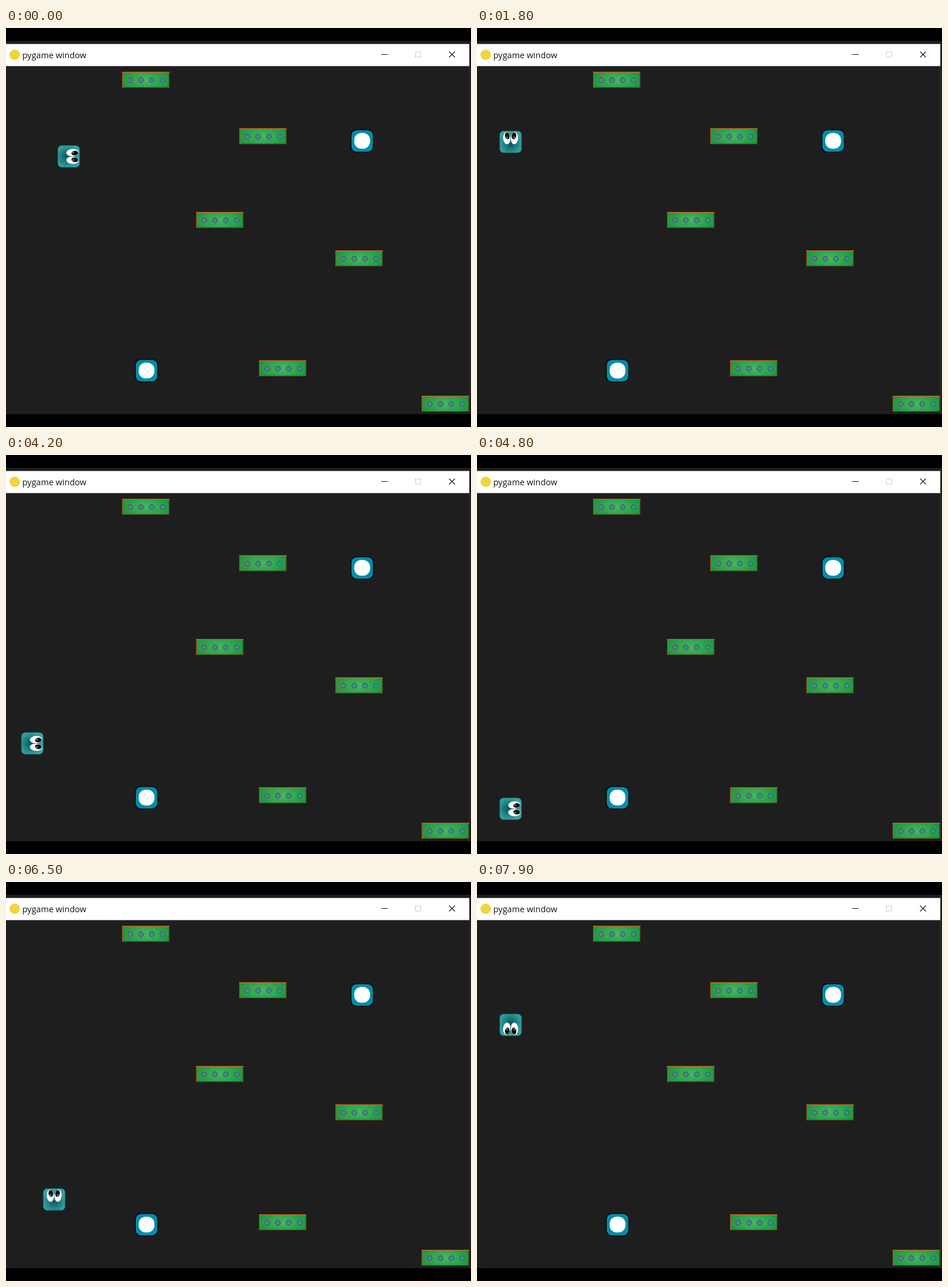
An HTML page with a canvas that plays this animation: 798x686 px, repeating every 8000 ms.

```html
<!DOCTYPE html>
<html lang="en">
<head>
<meta charset="utf-8">
<title>pygame window</title>
<style>
html, body { margin: 0; width: 100%; height: 100%; overflow: hidden; background: #000; }
canvas { display: block; }
</style>
</head>
<body>
<canvas id="stage" width="798" height="686"></canvas>
<script>
const ctx = document.getElementById("stage").getContext("2d");
const LOOP = 8000, TICK = 100, CELL = 12.5, SIZE = 38, SPEED = 4;
const UP = 0, RIGHT = 1, DOWN = 2, LEFT = 3;

const platforms = [[200, 76], [401, 173], [327, 317], [566, 383], [435, 572], [714, 633]];
const blocks = [[611.2, 194.2], [241.2, 589.2]];

// Key points of the walk: tick of arrival, column, row
const stops = [
  [0, 7, 11], [7, 22, -2], [9, 22, 1], [10, 22, -2], [17, 2, 12], [19, 4, 6],
  [22, 1, 9], [24, 3, 2], [27, -4, 5], [41, -4, 34], [43, 7, 31], [47, 0, 42],
  [48, 3, 42], [49, 7, 42], [53, 0, 37], [55, 5, 39], [57, 2, 41], [59, 1, 42],
  [60, 2, 43], [61, 2, 43], [62, 6, 41], [64, 8, 39], [67, 0, 33], [69, 2, 30],
  [71, 0, 29], [72, 2, 28], [74, -4, 24], [75, -4, 22], [77, 5, 17], [78, 3, 12],
  [79, 3, 13]
];

// Walks each leg as a staircase, leaving as late as the speed allows
function pose(tick) {
  let [last, col, row] = stops[0];
  let turn = RIGHT;
  for (const [end, toCol, toRow] of stops.slice(1)) {
    const dx = toCol - col, dy = toRow - row;
    const across = Math.abs(dx), total = across + Math.abs(dy);
    const start = Math.max(last, end - Math.ceil(total / SPEED));
    if (tick <= start) break;
    const part = Math.min(1, (tick - start) / (end - start));
    const steps = Math.round(total * part);
    const acrossAt = n => total ? Math.ceil(n * across / total) : 0;
    const moved = acrossAt(steps);
    if (steps) {
      const sideways = moved > acrossAt(steps - 1);
      turn = sideways ? (dx > 0 ? RIGHT : LEFT) : (dy > 0 ? DOWN : UP);
    }
    col += Math.sign(dx) * moved;
    row += Math.sign(dy) * (steps - moved);
    if (tick < end) break;
    last = end;
  }
  return { x: 1.2 + col * CELL, y: 64.3 + row * CELL, turn };
}

function rect(x, y, w, h, fill) {
  ctx.fillStyle = fill;
  ctx.fillRect(x, y, w, h);
}

function rounded(x, y, size, r, fill) {
  ctx.beginPath();
  ctx.roundRect(x - size / 2, y - size / 2, size, size, r);
  ctx.fillStyle = fill;
  ctx.fill();
}

function oval(x, y, rx, ry, fill, angle = 0) {
  ctx.beginPath();
  ctx.ellipse(x, y, rx, ry, angle, 0, Math.PI * 2);
  ctx.fillStyle = fill;
  ctx.fill();
}

function line(points, color, width, closed) {
  ctx.beginPath();
  for (const [x, y] of points) ctx.lineTo(x, y);
  if (closed) ctx.closePath();
  ctx.strokeStyle = color;
  ctx.lineWidth = width;
  ctx.stroke();
}

function radial(y, r, inner, outer) {
  const g = ctx.createRadialGradient(0, y, 0, 0, y, r);
  g.addColorStop(0, inner);
  g.addColorStop(1, outer);
  return g;
}

function drawWindow() {
  rect(0, 0, 798, 686, "#000002");
  rect(0, 22, 798, 642, "#1e1e1e");
  rect(795, 27, 1, 637, "#333");
  rect(0, 27.5, 795, 38, "#fff");
  oval(15, 46, 9, 9, "#f2d43c");
  ctx.fillStyle = "#111";
  ctx.font = '14.5px "Open Sans", "Noto Sans", sans-serif';
  ctx.fillText("pygame window", 28, 52);
  line([[644, 45.5], [655, 45.5]], "#111", 1);
  ctx.strokeStyle = "#ccc";
  ctx.strokeRect(702.5, 41, 9, 9);
  for (const s of [-5, 5]) line([[765.5 - s, 40.5], [765.5 + s, 50.5]], "#111", 1.1);
}

function drawPlatform([x, y]) {
  ctx.save();
  ctx.translate(x + 40, y + 13.2);
  rect(-40.5, -13.7, 81, 27.4, "#5f4220");
  ctx.save();
  ctx.scale(1, 0.5);
  rect(-39.3, -25, 78.6, 50, radial(0, 44, "#45b963", "#169a3e"));
  ctx.restore();
  rect(-40.5, -13.7, 81, 1.5, "#c4702c");
  rect(-40.5, -13.7, 1.3, 27, "#a8642a");
  for (let i = 0; i < 4; i++) {
    ctx.save();
    ctx.translate(-27 + i * 18.6, 0.5);
    const r = 6.5 - i * 0.3;
    line([[-r, 0], [0, -r], [r, 0], [0, r]], `rgba(150, 110, 70, ${1 - i * 0.15})`, 1.2, true);
    oval(0, 0, 4.6, 4.6, "#3d5f6b");
    oval(0, 0, 3.3, 3.3, "#2c9a94");
    ctx.restore();
  }
  ctx.restore();
}

function drawBlock([x, y]) {
  rounded(x, y, 40, 10, "#050708");
  rounded(x, y, 37, 9, "#058ca9");
  rounded(x, y - 0.2, 27, 12, "#fff");
}

function drawPlayer({ x, y, turn }) {
  ctx.save();
  ctx.beginPath();
  ctx.rect(0, 65.5, 795, 598.5);
  ctx.clip();
  ctx.translate(x + SIZE / 2, y + SIZE / 2);
  ctx.rotate(turn * Math.PI / 2);
  rounded(0, 0, SIZE, 7, "#237f80");
  rounded(0, 0, SIZE - 2, 6, radial(3, 20, "#06565a", "#36a3a3"));
  for (const side of [-1, 1]) {
    ctx.save();
    ctx.translate(side * 6.6, -6.3);
    oval(0, 0, 6.2, 10.5, "#fff", side * 0.08);
    oval(-side * 0.8, -4, 3.9, 5.8, "#080808", side * 0.15);
    oval(-side * 0.2, -1.2, 1.8, 2, "#666");
    ctx.restore();
  }
  ctx.restore();
}

function frame() {
  const tick = Math.floor(performance.now() % LOOP / TICK);
  drawWindow();
  platforms.forEach(drawPlatform);
  blocks.forEach(drawBlock);
  drawPlayer(pose(tick));
  requestAnimationFrame(frame);
}
frame();
</script>
</body>
</html>
```
